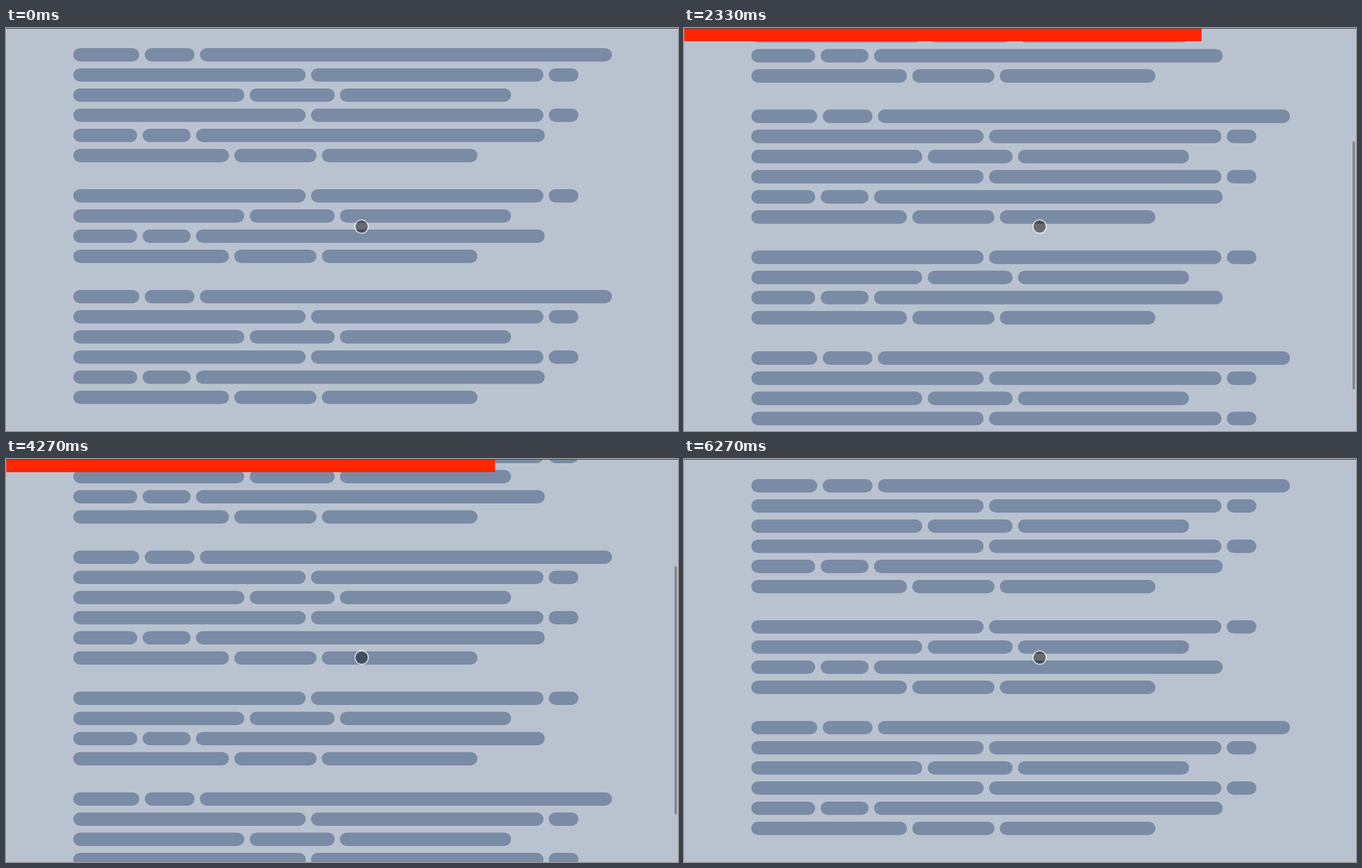
Write an HTML page that moves like this. It is 965 px wide and 580 px high and loops after 6730 ms.

```html
<!DOCTYPE html>
<html lang="en">
<head>
<meta charset="utf-8">
<title>Scroll progress</title>
<style>
  html, body { margin: 0; width: 100%; height: 100%; overflow: hidden; background: #b9c3cf; }
  svg { display: block; width: 100%; height: 100%; }
</style>
</head>
<body>
<svg viewBox="0 0 965 580">
  <rect width="965" height="580" fill="#b9c3cf"/>
  <g id="page" fill="#798ba5"></g>
  <rect id="bar" height="19" fill="#ff2600"/>
  <rect id="thumb" x="960" width="3.5" height="357" rx="1.5" fill="#828486"/>
  <rect width="1" height="580" fill="#b4b4aa" opacity=".45"/>
  <rect width="965" height="1" fill="#484c52"/>
  <circle cx="510.7" cy="285.8" r="9" fill="#050505" fill-opacity=".46"/>
  <circle cx="510.7" cy="285.8" r="9.7" fill="none" stroke="#fff" stroke-opacity=".62" stroke-width="1.7"/>
</svg>
<script>
const LOOP = 6730, STEP = 200 / 3, MAX = 337, WIDTH = 965, LINE = 29;
const $ = id => document.getElementById(id);

// Left and right edges of the pills in each kind of line
const LINES = {
  a: [96.6, 191.4, 199.2, 270.8, 278.4, 870.2],
  b: [96.6, 430.3, 438, 771.8, 779.4, 822],
  c: [96.6, 342.2, 350, 472, 479.5, 725.3],
  d: [96.6, 188.5, 196.2, 265.1, 272.8, 773.7],
  e: [96.6, 320.2, 327.8, 445.9, 453.5, 677]
};
const LAYOUT = 'abcbde bcde abcbde bcde abcbde';

// [time, scroll offset, speed per ms]
const KEYS = [
  [0, 0, 0],
  [800, 133.4, .16],
  [1330, 180, 0],
  [1610, 180, 0],
  [2333, 259.5, .15],
  [3000, MAX, 0],
  [3600, MAX, 0],
  [3667, 336, -.03],
  [4267, 245.2, -.19],
  [5333, 52.4, -.165],
  [5800, 0, 0],
  [LOOP, 0, 0]
];

$('page').innerHTML = [...LAYOUT].map((kind, row) => {
  const e = LINES[kind] || [];
  let pills = '';
  for (let i = 0; i < e.length; i += 2) {
    pills += `<rect x="${e[i]}" y="${28.9 + row * LINE}" width="${e[i + 1] - e[i]}" height="19.3" rx="9.65"/>`;
  }
  return pills;
}).join('');

const clamp = v => Math.max(0, Math.min(1, v));

function scrollAt(t) {
  const i = Math.max(1, KEYS.findIndex(k => k[0] >= t));
  const [t0, p0, v0] = KEYS[i - 1], [t1, p1, v1] = KEYS[i];
  const d = t1 - t0, u = (t - t0) / d, w = 1 - u;
  const p = p0 * w * w * (1 + 2 * u) + p1 * u * u * (3 - 2 * u)
          + d * u * w * (v0 * w - v1 * u);
  return Math.max(0, Math.min(MAX, p));
}

function thumbAlpha(t) {
  if (t < 60) return 0;
  const fadeFrom = t < 3640 ? 3133 : 5867;
  return 1 - clamp((t - fadeFrom) / 400);
}

function draw(ms) {
  const t = Math.min(LOOP, Math.floor((ms % LOOP + 8) / STEP) * STEP);
  const y = scrollAt(t);
  $('page').setAttribute('transform', `translate(0 ${-y})`);
  $('bar').setAttribute('width', y / MAX * WIDTH);
  $('thumb').setAttribute('y', 4 + y * .614);
  $('thumb').setAttribute('opacity', thumbAlpha(t));
}

const start = performance.now();
function tick() {
  draw(performance.now() - start);
  requestAnimationFrame(tick);
}
tick();
</script>
</body>
</html>
```
